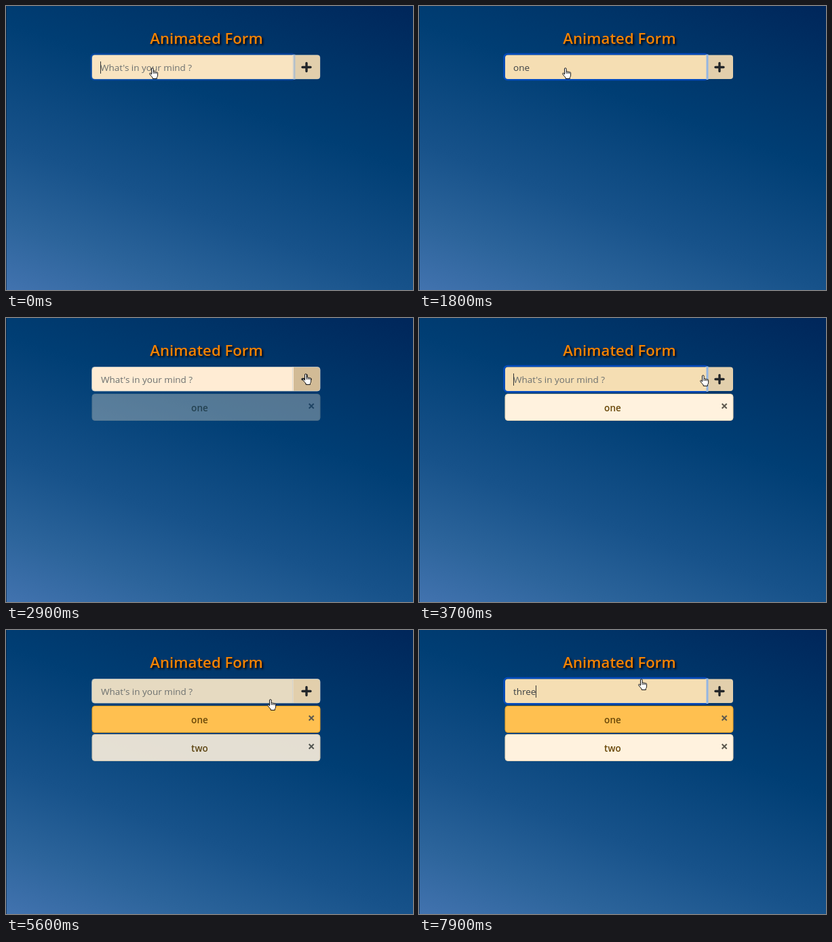
These frames come from a looping animation (600 px wide and 420 px high, 8000 ms). An HTML page:

```html
<!DOCTYPE html>
<html lang="en">
<head>
<meta charset="utf-8">
<title>Animated Form</title>
<style>
  html, body { margin: 0; width: 100%; height: 100%; overflow: hidden; }
  body { background: linear-gradient(20deg, #4273af 0%, #2c649b 16%, #17528a 34%, #003e74 62%, #003468 80%, #00265a 100%); }
  svg { position: absolute; left: 0; top: 0; display: block; }
  text { font: 13.5px "Open Sans", "Noto Sans", sans-serif; fill: #3b4045; }
  .title { font-size: 22.2px; font-weight: 600; fill: #f58200; text-anchor: middle;
    filter: drop-shadow(2px 2px 1.5px rgba(0, 0, 0, .95)); }
  .item text { font-size: 13.6px; font-weight: 600; fill: #694708; text-anchor: middle; }
  .item path { stroke: #5c584e; stroke-width: 2; }
  #hint { fill: #6c706f; }
</style>
</head>
<body>
<svg width="600" height="420" viewBox="0 0 600 420">
  <rect width="1" height="420" fill="#061f3d" opacity=".7"/>
  <text class="title" x="295.5" y="56">Animated Form</text>

  <rect id="ring" x="125.5" y="71" width="300.5" height="38" rx="5" fill="none" stroke="#0350d8" stroke-opacity=".75" stroke-width="2.5"/>
  <path id="button" d="M422 72.5H459a4 4 0 0 1 4 4V104a4 4 0 0 1-4 4H422z"/>
  <path id="field" d="M424 72.5H131a4 4 0 0 0-4 4V104a4 4 0 0 0 4 4H424z"/>
  <path id="edge" d="M130.5 72.5H459a4 4 0 0 1 4 4V104a4 4 0 0 1-4 4H130.5a4 4 0 0 1-4-4V76.5a4 4 0 0 1 4-4zM422.5 72.5V108" fill="none" stroke="#cfd0cd" stroke-opacity=".75"/>
  <path id="divide" d="M425 71.5V109" stroke="#94b6e2" stroke-width="3"/>
  <path d="M443 84.5V96.5M437 90.5H449" stroke="#212529" stroke-width="3.4" stroke-linecap="round"/>
  <text id="hint" y="96">What's in your mind ?</text>
  <text id="typed" y="96"></text>
  <path id="caret" d="M0 82V100" stroke="#333"/>

  <g id="one" class="item">
    <rect x="127" y="112.5" width="336" height="39" rx="4"/>
    <text x="285.5" y="138">one</text>
    <path d="M446.7 126.7l7 7M453.7 126.7l-7 7"/>
  </g>
  <g id="two" class="item">
    <rect x="127" y="154.5" width="336" height="39" rx="4" fill="#fff2de" stroke="#ead7b6"/>
    <text x="285.5" y="180">two</text>
    <path d="M446.7 168.7l7 7M453.7 168.7l-7 7"/>
  </g>

  <path id="hand" d="M3.5 10.2V2a1.3 1.3 0 0 1 2.6 0V6.3a1.2 1.2 0 0 1 2.3 .4a1.2 1.2 0 0 1 2.2 .5a1.1 1.1 0 0 1 2 .7V11.8Q12.4 13.6 11.4 14.6V16.5H5.2V15Q2.8 12.4 .8 9.8Q.3 8.4 1.5 8.2Q2.5 8.2 3.5 10.2M6.1 6.3V9M8.4 6.7V9M10.6 7.2V9.2" fill="#fff" stroke="#111" stroke-width="1" stroke-linejoin="round"/>
</svg>
<script>
const LOOP = 8000, FADE = 700, BLINK = 530;
const $ = id => document.getElementById(id);
const set = (id, attrs) => { for (const k in attrs) $(id).setAttribute(k, attrs[k]); };
const clamp = v => Math.max(0, Math.min(1, v));
const smooth = v => { v = clamp(v); return v * v * (3 - 2 * v); };
const mix = (a, b, p) => a.map((v, i) => v + (b[i] - v) * p);
const rgb = c => `rgb(${c.map(Math.round)})`;

// time, left, top of the pointer
const path = [
  [0, 211, 91], [1850, 211, 91], [2200, 464, 88], [2450, 437, 82], [3150, 437, 82],
  [3550, 414, 84], [4550, 414, 84], [4900, 440, 85], [5250, 440, 85], [5600, 385, 102],
  [5900, 360, 97], [6500, 345, 88], [7100, 323, 72], [LOOP, 323, 72]
];
// time, field text
const typing = [
  [0, ''], [900, 'o'], [1050, 'on'], [1200, 'one'], [2750, ''],
  [4000, 't'], [4150, 'tw'], [4300, 'two'], [5170, ''],
  [7400, 't'], [7500, 'th'], [7700, 'thr'], [7850, 'three']
];
const focus = [[-80, 2550], [3550, 5020], [7200, 9000]];
const hoverButton = [[2100, 3300], [4720, 5380]];
const hoverField = [[5400, 7250]];

const last = (rows, t) => rows.filter(r => r[0] <= t).pop();
const level = (spans, t, d) =>
  spans.reduce((m, [a, b]) => Math.max(m, Math.min(clamp((t - a) / d), 1 - clamp((t - b) / d))), 0);

function pointer(t) {
  const i = Math.max(1, path.findIndex(r => r[0] > t));
  const a = path[i - 1], b = path[i];
  return mix(a.slice(1), b.slice(1), smooth((t - a[0]) / (b[0] - a[0])));
}

// inverse of the CSS "ease" curve by bisection
function ease(x) {
  x = clamp(x);
  const bez = (a, b, s) => 3 * a * s * (1 - s) ** 2 + 3 * b * s * s * (1 - s) + s ** 3;
  let lo = 0, hi = 1;
  for (let i = 0; i < 20; i++) {
    const s = (lo + hi) / 2;
    bez(.25, .25, s) < x ? lo = s : hi = s;
  }
  return bez(.1, 1, lo);
}

function draw(t) {
  const [typedAt, words] = last(typing, t);
  const lit = level(focus, t, 140);
  const span = focus.find(([a, b]) => t >= a && t < b);
  const left = span ? 139 : 140;

  let tone = mix([255, 236, 212], [230, 218, 193], level(hoverField, t, 150));
  set('field', { fill: rgb(mix(tone, [245, 222, 179], lit)) });
  set('button', { fill: rgb(mix([226, 207, 172], [210, 187, 150], level(hoverButton, t, 150))) });
  set('ring', { opacity: lit });
  set('divide', { opacity: lit });
  set('edge', { opacity: 1 - lit });

  set('hint', { x: left, opacity: words ? 0 : 1 });
  set('typed', { x: left });
  if ($('typed').textContent !== words) $('typed').textContent = words;

  const since = span ? t - Math.max(span[0], typedAt) : 0;
  const on = span && since % (2 * BLINK) < BLINK;
  const x = Math.round(left + (words ? $('typed').getComputedTextLength() : 0)) + .5;
  set('caret', { transform: `translate(${x} 0)`, opacity: on ? 1 : 0 });

  set('one', { opacity: ease((t - 2750) / FADE) });
  set('two', { opacity: ease((t - 5170) / FADE) });
  const gold = smooth((t - 5170) / 250);
  set('one', {
    fill: rgb(mix([255, 242, 222], [255, 192, 80], gold)),
    stroke: rgb(mix([234, 215, 182], [232, 160, 36], gold))
  });
  set('hand', { transform: `translate(${pointer(t).map(Math.round)})` });
}

for (const el of document.querySelectorAll('.item text')) el.setAttribute('stroke', 'none');
const start = performance.now();
function tick() {
  draw((performance.now() - start) % LOOP);
  requestAnimationFrame(tick);
}
draw(0);
tick();
</script>
</body>
</html>
```
